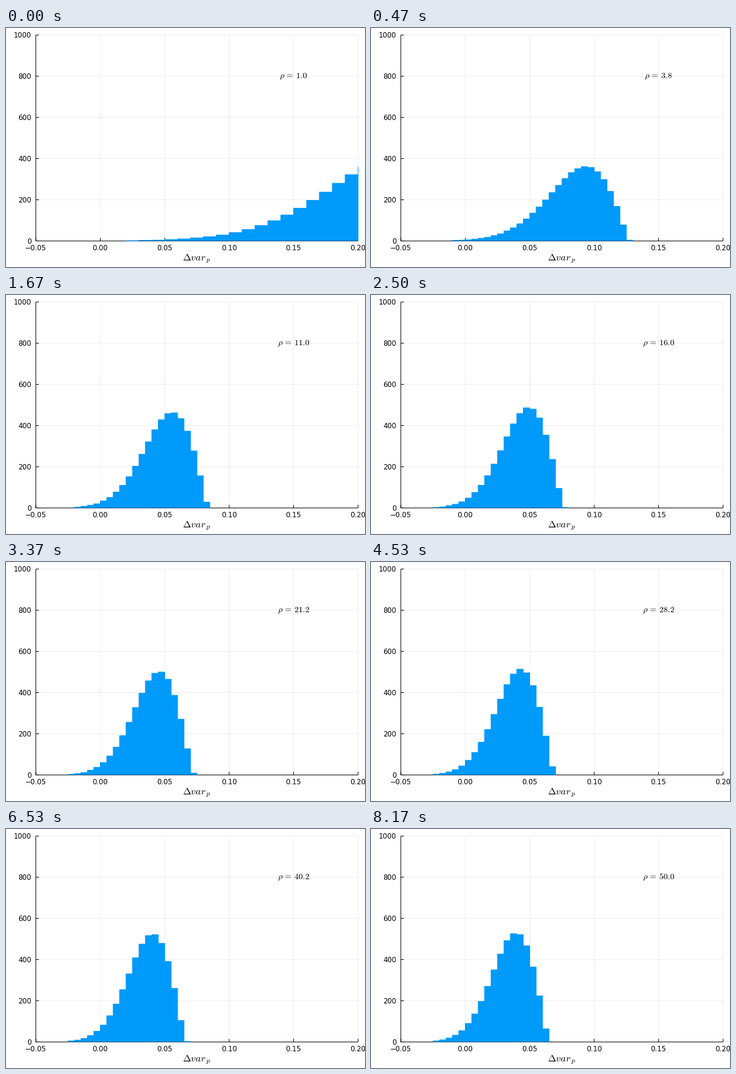
Write a matplotlib script that moves like this. It is 600x400 px and loops after 8.21 s.

```python
import numpy as np
import matplotlib.pyplot as plt
from matplotlib.animation import FuncAnimation
from matplotlib.lines import Line2D
from matplotlib.transforms import Bbox

W, H, DPI = 600, 400, 100
STEPS, LOOP = 246, 8210
FRAMES = STEPS + 1  # the last step holds a little longer
LEFT, RIGHT, TOP, BOTTOM = 49.85, 588.4, 11.8, 356.4
PX = 72 / DPI
BLUE = "#009afa"

plt.rcParams["font.family"] = "DejaVu Sans"
plt.rcParams["mathtext.fontset"] = "cm"

# Left-skewed (reversed Weibull) spread, evenly sampled by quantile.
SPREAD = -np.log(np.linspace(0.0012, 1, 4250))
BASE = 0.0591 - 0.0336 * SPREAD ** 0.485
GAIN = 0.27 - 0.0615 * SPREAD ** 0.625


def histogram(rho):
    """Freedman-Diaconis bin width, rounded to 0.005 or 0.01."""
    x = BASE + GAIN / (rho + 0.22)
    q1, q3 = np.percentile(x, [25, 75])
    width = 2 * (q3 - q1) / len(x) ** (1 / 3)
    step = 0.01 if width > 0.0055 else 0.005
    edges = np.arange(np.floor(x.min() / step),
                      np.ceil(x.max() / step) + 1) * step
    return np.histogram(x, edges)[0], edges


def line(x0, y0, x1, y1, width=1.0, alpha=1.0):
    fig.add_artist(Line2D([x0 / W, x1 / W], [1 - y0 / H, 1 - y1 / H],
                          color="black", lw=width * PX, alpha=alpha,
                          solid_capstyle="butt", snap=False, zorder=-1))


def label(x, y, s, size, ha="center"):
    return fig.text(x / W, 1 - y / H, s, fontsize=size * PX,
                    ha=ha, va="baseline", color="black")


fig = plt.figure(figsize=(W / DPI, H / DPI), dpi=DPI, facecolor="white")
ax = fig.add_axes([LEFT / W, 1 - BOTTOM / H,
                   (RIGHT - LEFT) / W, (BOTTOM - TOP) / H])
ax.axis("off")

for x, y, i in zip(np.linspace(LEFT, RIGHT, 6),
                   np.linspace(BOTTOM, TOP, 6), range(6)):
    line(x, TOP, x, BOTTOM, 0.7, 0.1)
    line(LEFT, y, RIGHT, y, 0.7, 0.1)
    line(x, BOTTOM, x, BOTTOM - 5.2)
    line(LEFT, y, LEFT + 5.2, y)
    value = f"{0.05 * (i - 1):.2f}".replace("-", "\u2212")
    label(x, 371.6, value, 11.6)
    label(42.3, y + 4.4, str(200 * i), 11.6, "right")
line(LEFT, TOP, LEFT, BOTTOM)
line(LEFT, BOTTOM, RIGHT, BOTTOM)

label(318.5, 389, r"$\Delta var_{\,p}$", 16.4)
rho_text = label(480.5, 84.5, "", 14.1)

bars = ax.stairs([0], [0, 0.01], fill=True, facecolor=BLUE, edgecolor=BLUE,
                 lw=PX, snap=False)
bars.set_clip_box(Bbox([[LEFT, H - BOTTOM - 1], [RIGHT + 0.6, H - TOP]]))
ax.set(xlim=(-0.05, 0.2), ylim=(0, 1000))


def draw(i):
    rho = 1 + 0.2 * min(i, STEPS - 1)
    counts, edges = histogram(rho)
    bars.set_data(counts, edges, 0)
    rho_text.set_text(rf"$\rho\,=\,{rho:.1f}$")
    return bars, rho_text


anim = FuncAnimation(fig, draw, frames=FRAMES, interval=LOOP / FRAMES,
                     repeat=True, repeat_delay=0, blit=False)
plt.show()
```
